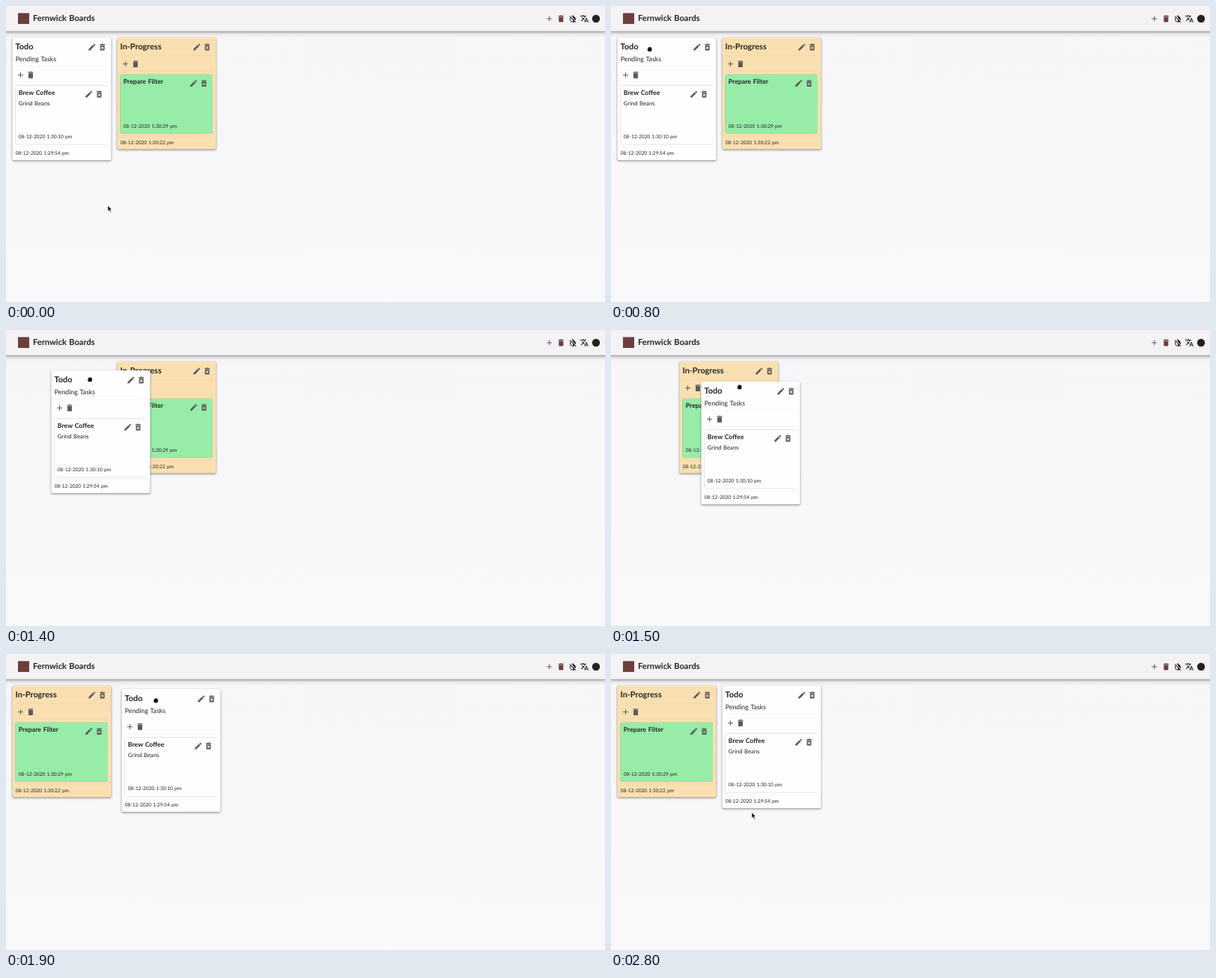
Recreate the animation shown at these times as an HTML page. Size 800 by 396 pixels, loop 2900 ms.

```html
<!DOCTYPE html>
<html lang="en">
<head>
<meta charset="utf-8">
<title>Task board</title>
<style>
  html, body { margin: 0; width: 100%; height: 100%; overflow: hidden; background: #f8f7fa; }
  svg { display: block; width: 800px; height: 396px; }
  text { font-family: Lato, "Open Sans", sans-serif; fill: #222; word-spacing: .07em; text-rendering: geometricPrecision; }
  .bold { font-weight: 700; }
  .icon { fill: #5c5a5c; }
  .rule { stroke: #000; stroke-opacity: .07; stroke-width: .6; }
  .bar { filter: drop-shadow(0 1px 1px rgba(0,0,0,.25)) drop-shadow(0 2px 2.5px rgba(0,0,0,.25)); }
  .column { filter: drop-shadow(0 1px 1px rgba(0,0,0,.3)) drop-shadow(0 1px 1.5px rgba(0,0,0,.2)); }
  .card { filter: drop-shadow(0 .6px .6px rgba(0,0,0,.4)); }
</style>
</head>
<body>
<svg id="stage" viewBox="0 0 800 396"></svg>
<script>
const icons = {
  add: 'M19 13h-6v6h-2v-6H5v-2h6V5h2v6h6v2z',
  bin: 'M6 19c0 1.1.9 2 2 2h8c1.1 0 2-.9 2-2V7H6v12zM19 4h-3.5l-1-1h-5l-1 1H5v2h14V4z',
  remove: 'M6 19c0 1.1.9 2 2 2h8c1.1 0 2-.9 2-2V7H6v12zm2.46-7.12l1.41-1.41L12 12.59l2.12-2.12 1.41 1.41L13.41 14l2.12 2.12-1.41 1.41L12 15.41l-2.12 2.12-1.41-1.41L10.59 14l-2.13-2.12zM15.5 4l-1-1h-5l-1 1H5v2h14V4z',
  edit: 'M3 17.25V21h3.75L17.81 9.94l-3.75-3.75L3 17.25zM20.71 7.04c.39-.39.39-1.02 0-1.41l-2.34-2.34c-.39-.39-1.02-.39-1.41 0l-1.83 1.83 3.75 3.75 1.83-1.83z',
  invert: 'M20.65 20.87l-2.35-2.35-6.3-6.29-3.56-3.57-1.42-1.41L4.27 4.5 3 5.77l2.78 2.78c-2.55 3.14-2.36 7.76.56 10.69C7.9 20.8 9.95 21.58 12 21.58c1.79 0 3.57-.59 5.03-1.78l2.7 2.7L21 21.23zM12 19.59c-1.6 0-3.11-.62-4.24-1.76C6.62 16.69 6 15.19 6 13.59c0-1.32.43-2.57 1.21-3.6L12 14.77v4.82zM12 5.1v4.58l7.25 7.26c1.37-2.96.84-6.57-1.6-9.01L12 2.27l-3.7 3.7 1.41 1.41L12 5.1z',
  language: 'M12.87 15.07l-2.54-2.51.03-.03c1.74-1.94 2.98-4.17 3.71-6.53H17V4h-7V2H8v2H1v1.99h11.17C11.5 7.92 10.44 9.75 9 11.35 8.07 10.32 7.3 9.19 6.69 8h-2c.73 1.63 1.73 3.17 2.98 4.56l-5.09 5.02L4 19l5-5 3.11 3.11.76-2.04zM18.5 10h-2L12 22h2l1.12-3h4.75L21 22h2l-4.5-12zm-2.62 7l1.62-4.33L19.12 17h-3.24z'
};

const icon = (name, x, y, color = '') =>
  `<path class="icon" d="${icons[name]}" transform="translate(${x - 6} ${y - 6}) scale(.5)" ${color && `style="fill:${color}"`}/>`;
const label = (text, x, y, size, bold = '') =>
  `<text class="${bold}" x="${x}" y="${y}" font-size="${size}">${text}</text>`;
const rule = y => `<path class="rule" d="M4.5 ${y}H127.5"/>`;
const box = (cls, x, y, w, h, fill) =>
  `<rect class="${cls}" x="${x}" y="${y}" width="${w}" height="${h}" rx="2" fill="${fill}"/>`;

// Coordinates are local to the column's top left corner.
function column({ id, title, note, date, fill, card }) {
  const dy = note ? 14.7 : 0;
  return `<g id="${id}">
    ${box('column', 0, 0, 132, 149.5 + dy, fill)}
    ${label(title, 4, 16.4, 10.9, 'bold')}
    ${icon('edit', 106.3, 13)}${icon('remove', 120.2, 13)}
    ${note ? label(note, 4.2, 32.2, 8.8) : ''}
    ${rule(24.3 + dy)}
    ${icon('add', 11, 35.6 + dy)}${icon('bin', 24.5, 35.6 + dy)}
    ${rule(44.7 + dy)}
    <g transform="translate(4 ${49.7 + dy})">
      ${box('card', 0, 0, 123.5, 78.8, card.fill)}
      ${label(card.title, 4.3, 12.8, 8.7, 'bold')}
      ${label(card.note, 4.3, 27, 7.7)}
      ${icon('edit', 98.2, 11.7)}${icon('remove', 112, 11.7)}
      ${label(card.date, 4.3, 71.1, 6.6)}
    </g>
    ${rule(132 + dy)}
    ${label(date, 4.2, 142.5 + dy, 6.6)}
  </g>`;
}

const stage = document.getElementById('stage');
stage.innerHTML = `
  <linearGradient id="paper" x2="0" y2="1"><stop stop-color="#f6f5f7"/><stop offset="1" stop-color="#f9f8fb"/></linearGradient>
  <rect width="800" height="396" fill="url(#paper)"/>
  <rect class="bar" x="-10" y="-10" width="820" height="43.7" fill="#f4f2f5"/>
  <rect x="16" y="9.5" width="15" height="14.5" fill="#6d3f3b"/>
  ${label('Fernwick Boards', 36, 20.4, 11.05, 'bold')}
  ${icon('add', 725.7, 17)}${icon('bin', 741.3, 17, '#6d3f3b')}
  ${icon('invert', 757, 17, '#222')}${icon('language', 772.4, 17, '#222')}
  <circle cx="788" cy="17" r="5.2" fill="#222"/>
  ${column({ id: 'progress', title: 'In-Progress', date: '08-12-2020 1:30:22 pm', fill: '#fae0b1',
    card: { title: 'Prepare Filter', note: '', date: '08-12-2020 1:30:29 pm', fill: '#97eca8' } })}
  ${column({ id: 'todo', title: 'Todo', note: 'Pending Tasks', date: '08-12-2020 1:29:54 pm', fill: '#fefefe',
    card: { title: 'Brew Coffee', note: 'Grind Beans', date: '08-12-2020 1:30:10 pm', fill: '#fefefe' } })}
  <g id="pointer" stroke="#fff" stroke-width=".5" fill="#111">
    <path id="arrow" d="M0 0V7.6L1.8 6L3.1 9L4.4 8.4L3.1 5.5H5.5Z"/>
    <path id="fist" d="M-1.8 3.5L-3.1 1Q-3.5-.4-2.2-.6V-2Q-1.5-3-.6-2.5Q.2-3.6 1-2.6Q2-3 2.2-2Q3.3-2 3.2-.7V1.2L2.4 3.5Z"/>
  </g>`;

// Keys are [time, x, y]
const pointerKeys = [[0, 136, 267], [200, 172, 225], [300, 187, 168], [400, 165, 105], [500, 118, 55],
  [600, 79, 32], [700, 43, 55], [800, 51.5, 57.5], [1200, 57.3, 57.5], [1300, 57.3, 57.5], [1400, 112, 66],
  [1500, 171.5, 76], [1700, 200, 62], [1900, 200, 62], [2000, 199, 68], [2100, 193, 78], [2400, 190, 140], [2800, 188, 212]];
const dragKeys = [[0, 0, 0], [1300, 0, 0], [1400, 52, 12], [1500, 112, 27], [1600, 139, 17], [1700, 151.5, 10],
  [1800, 151.5, 10], [1900, 146, 5], [2000, 141.2, 1], [2100, 140.2, 0], [2400, 140, 0], [2800, 140, 0]];

function at(keys, t) {
  const next = Math.max(1, keys.findIndex(key => key[0] >= t));
  const [t0, x0, y0] = keys[next - 1], [t1, x1, y1] = keys[next];
  const k = (t - t0) / (t1 - t0);
  return [x0 + (x1 - x0) * k, y0 + (y1 - y0) * k];
}
const easeOut = k => 1 - (1 - Math.min(1, Math.max(0, k))) ** 3;
const find = id => document.getElementById(id);
const move = (id, x, y) => find(id).setAttribute('transform', `translate(${x} ${y})`);

function draw(now) {
  const t = Math.floor(now % 2900 / 100) * 100; // the picture updates ten times a second
  const [dx, dy] = at(dragKeys, t);
  move('todo', 8.5 + dx, 42 + dy);
  move('progress', 148.5 - 140 * easeOut((t - 1468) / 200), 42);
  move('pointer', ...at(pointerKeys, t));
  const holding = t >= 700 && t < 2000;
  find('fist').style.display = holding ? '' : 'none';
  find('arrow').style.display = holding ? 'none' : '';
}

const start = performance.now();
(function tick() {
  draw(performance.now() - start);
  requestAnimationFrame(tick);
})();
</script>
</body>
</html>
```
